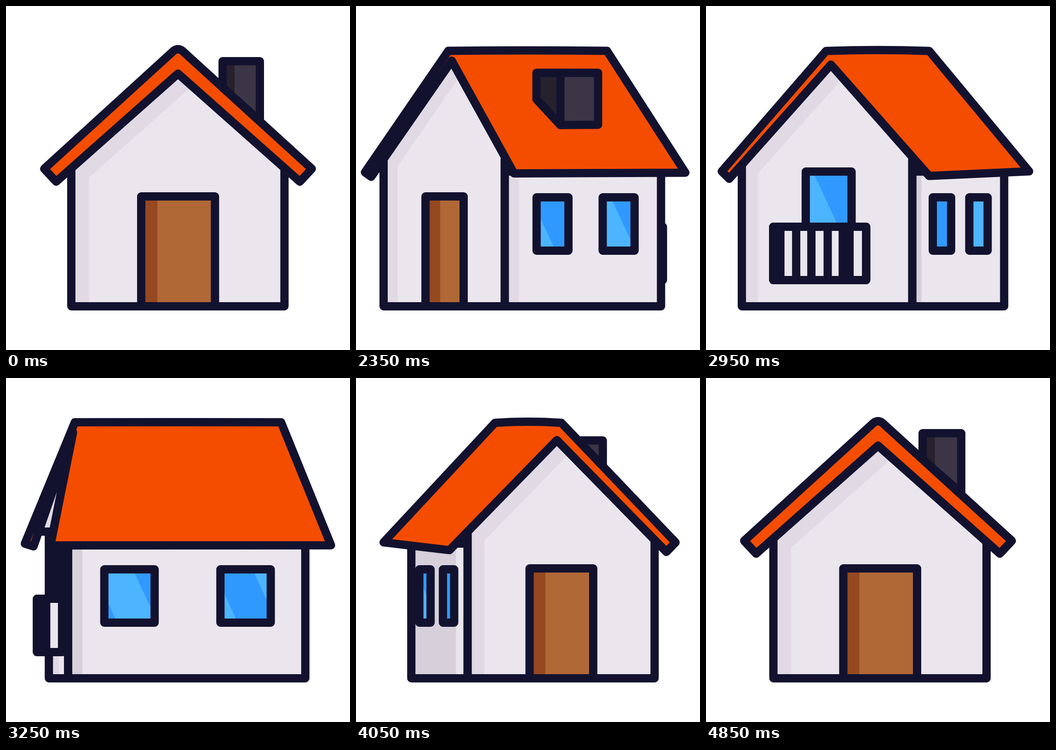
Write an HTML page with a canvas that moves like this. It is 748x748 px and loops after 4.87 s.

```html
<!DOCTYPE html>
<html lang="en">
<head>
<meta charset="utf-8">
<title>Turning house</title>
<style>
html, body { margin: 0; width: 100%; height: 100%; overflow: hidden; background: #fff; }
canvas { display: block; width: 100vw; height: 100vh; }
</style>
</head>
<body>
<canvas width="748" height="748"></canvas>
<script>
const SIZE = 748, LOOP = 4870, GROUND = 653;
const INK = '#12122f', ORANGE = '#f44d00', LIGHT = '#ebe6ed', SHADE = '#e1dae4', DEEP = '#d7d0db';
const g = document.querySelector('canvas').getContext('2d');
g.lineWidth = 18;
g.lineJoin = g.lineCap = 'round';
g.strokeStyle = INK;

// time, quarter turns done, speed
const PACE = [
  [2010, 0, .0004], [2350, .598, .003], [2700, 1.685, .003],
  [3250, 2.935, .00165], [4050, 3.786, .0006], [LOOP, 4, 0]
];

// Each part has three poses: gable end facing, corner facing, long side facing
const ROOF = {
  ridgeNear: [[365, 97], [216, 98], [140, 96]],
  ridgeFar: [[383, 97], [530, 98], [608, 96]],
  eaveFar: [[665, 354], [719, 362], [705, 364]],
  eaveCorner: [[639, 382], [418, 364], [50, 364]],
  gable: [[374, 147], [227, 119], [134, 118]],
  tipLow: [[109, 382], [25, 373], [65, 365]],
  tip: [[83, 354], [13, 362], [45, 360]]
};
const WALLS = [[142, 605.5, 605.5], [50, 380, 667], [99.5, 99.5, 648.5]];
const PANES = [[600, 600, 607, 607], [446.5, 503.7, 557.5, 614.8], [180, 297, 453, 570]];
// three x, then top and three bottoms
const STACK = [[471, 552, 552, 120, 177, 250, 250], [408, 473, 554, 142, 188, 258, 257], [331, 331, 417, 158, 262, 262, 263]];
const STACK_BEHIND = [[193, 277, 277, 120, 250, 177, 177], [236, 348, 348, 157, 270, 200, 200], [331, 417, 417, 185, 262, 262, 262]];
const RAILS = [
  [473, 458, 438, 406, 374, 342, 310, 275],
  [294, 248.5, 236, 203, 166, 132.5, 97, 90],
  [97, 64, 64, 64, 64, 64, 64, 64]
];

const mix = (a, b, k) => a + (b - a) * k;
const pose = (v, a, b, c) => v < .5 ? mix(a, b, 2 * v) : mix(b, c, 2 * v - 1);
const poses = (v, [a, b, c]) => a.map((n, i) => pose(v, n, b[i], c[i]));

function turnAt(t) {
  if (t <= PACE[0][0]) return 0;
  const i = PACE.findIndex(p => p[0] > t);
  const [t0, a, m0] = PACE[i - 1], [t1, b, m1] = PACE[i];
  const d = t1 - t0, z = (t - t0) / d, y = 1 - z;
  return a * y * y * (1 + 2 * z) + b * z * z * (3 - 2 * z) + d * z * y * (m0 * y - m1 * z);
}

function trace(points) {
  g.beginPath();
  points.forEach(p => g.lineTo(...p));
  g.closePath();
}

// Fill an outline, paint details inside it, then ink its edge
function shape(points, fill, inside) {
  trace(points);
  g.fillStyle = fill;
  g.fill();
  if (inside) {
    g.save();
    g.clip();
    inside();
    g.restore();
    trace(points);
  }
  g.stroke();
}

function fillPoly(points, fill) {
  trace(points);
  g.fillStyle = fill;
  g.fill();
}

const box = (l, t, r, b) => [[l, t], [r, t], [r, b], [l, b]];

function line(x0, y0, x1, y1) {
  g.beginPath();
  g.moveTo(x0, y0);
  g.lineTo(x1, y1);
  g.stroke();
}

function glass(l, t, r, b, turn) {
  shape(box(l, t, r, b), '#4db4ff', () => {
    for (let x = 18 + 30 * turn - 348; x < SIZE; x += 174) {
      const at = y => x + (y - 425) / 2.15;
      fillPoly([[at(t), t], [at(t) + 86, t], [at(b) + 86, b], [at(b), b]], '#3099ff');
    }
  });
}

function chimney(v, odd, X, keys, shift) {
  let [a, b, c, top, ya, yb, yc] = poses(v, keys);
  [a, b, c] = [a, b, c].map(x => X(x + shift));
  const left = Math.min(a, b), dark = Math.abs(b - a) * pose(v, .32, .78, 1);
  shape([[a, top], [c, top], [c, yc], [b, yb], [a, ya]], '#3c3545',
    () => fillPoly(box(left, top, left + dark, 300), '#27212d'));
  if (Math.abs(c - b) > 1) line(b, top, b, yb);
}

function balcony(xs) {
  shape(box(Math.min(...xs), 480, Math.max(...xs), 596), LIGHT);
  xs.forEach(x => line(x, 480, x, 596));
}

function sideWall(l, r, v, quarter, X, turn) {
  const part = quarter % 2 ? pose(v, 1.36, .03, .054) : pose(v, .1, .1, .054);
  shape(box(l, 360, r, GROUND), LIGHT,
    () => fillPoly(box(l, 360, l + Math.min(1, part) * (r - l), GROUND), quarter < 2 ? SHADE : DEEP));
  const x = poses(v, PANES).map(X).sort((a, b) => a - b);
  glass(x[0], 416, x[1], 532, turn);
  glass(x[2], 416, x[3], 532, turn);
}

function endWall(l, r, top, low, high, back, turn) {
  const w = r - l, f = w / 463;
  const slopeL = (low[1] - top[1]) / (low[0] - top[0]);
  const slopeR = (high[1] - top[1]) / (high[0] - top[0]);
  const yl = Math.max(334, top[1] + slopeL * (l - top[0]));
  const yr = Math.max(334, top[1] + slopeR * (r - top[0]));
  const xl = top[0] + (yl - top[1]) / slopeL, xr = top[0] + (yr - top[1]) / slopeR;
  shape([[l, GROUND], [l, yl], [xl, yl], top, [xr, yr], [r, yr], [r, GROUND]], SHADE, () => {
    const x = l + 20 + .04 * w;
    const y = top[1] + slopeL * (x - top[0] - .1 * w - 15);
    fillPoly([[x, GROUND], [x, y], [x + 500, y + 500 * slopeL], [x + 900, GROUND]], LIGHT);
  });
  if (back) {
    glass(l + .375 * w, 360, l + .644 * w, 480, turn);
  } else {
    const a = l + .328 * w + 11 * (1 - f), b = l + .674 * w - 8 * (1 - f);
    shape(box(a, 414, b, GROUND), '#b06836',
      () => fillPoly(box(a, 414, a + 28 + 7 * f, GROUND), '#964821'));
  }
}

function roof(p, v) {
  g.beginPath();
  g.moveTo(...p.ridgeNear);
  g.quadraticCurveTo((p.ridgeNear[0] + p.ridgeFar[0]) / 2, pose(v, 91, 95, 96), ...p.ridgeFar);
  for (const k of ['eaveFar', 'eaveCorner', 'gable', 'tipLow', 'tip']) g.lineTo(...p[k]);
  g.closePath();
  g.fillStyle = ORANGE;
  g.fill();
  g.stroke();
}

function draw(turn) {
  const quarter = Math.min(3, Math.floor(turn));
  const odd = quarter % 2, back = quarter === 1 || quarter === 2;
  const v = odd ? 1 - turn + quarter : turn - quarter;
  const X = x => odd ? SIZE - x : x;
  const p = {};
  for (const k in ROOF) {
    const [x, y] = poses(v, ROOF[k]);
    p[k] = [X(x), y];
  }
  const drift = odd * 4 * Math.min(1, 2 - 2 * v);
  const [end, corner, far] = poses(v, WALLS).map(x => X(x) + drift);

  g.fillStyle = '#fff';
  g.fillRect(0, 0, SIZE, SIZE);
  if (quarter > 1) chimney(v, odd, X, STACK_BEHIND, 0);
  if (!back && v > .01) balcony([pose(v, 600, 663, 651), pose(v, 600, 663, 684)].map(X));
  if (v > .002) sideWall(Math.min(corner, far), Math.max(corner, far), v, quarter, X, turn);
  if (Math.abs(corner - end) > 14) {
    const [low, high] = odd ? [p.eaveCorner, p.tipLow] : [p.tipLow, p.eaveCorner];
    endWall(Math.min(end, corner), Math.max(end, corner), p.gable, low, high, back, turn);
  }
  roof(p, v);
  if (quarter < 2) chimney(v, odd, X, STACK, odd * 11 * (1 - Math.abs(2 * v - 1)));
  if (back) balcony(poses(v, RAILS).map(X));
}

const start = performance.now();
function tick() {
  draw(turnAt((performance.now() - start) % LOOP));
  requestAnimationFrame(tick);
}
tick();
</script>
</body>
</html>
```
